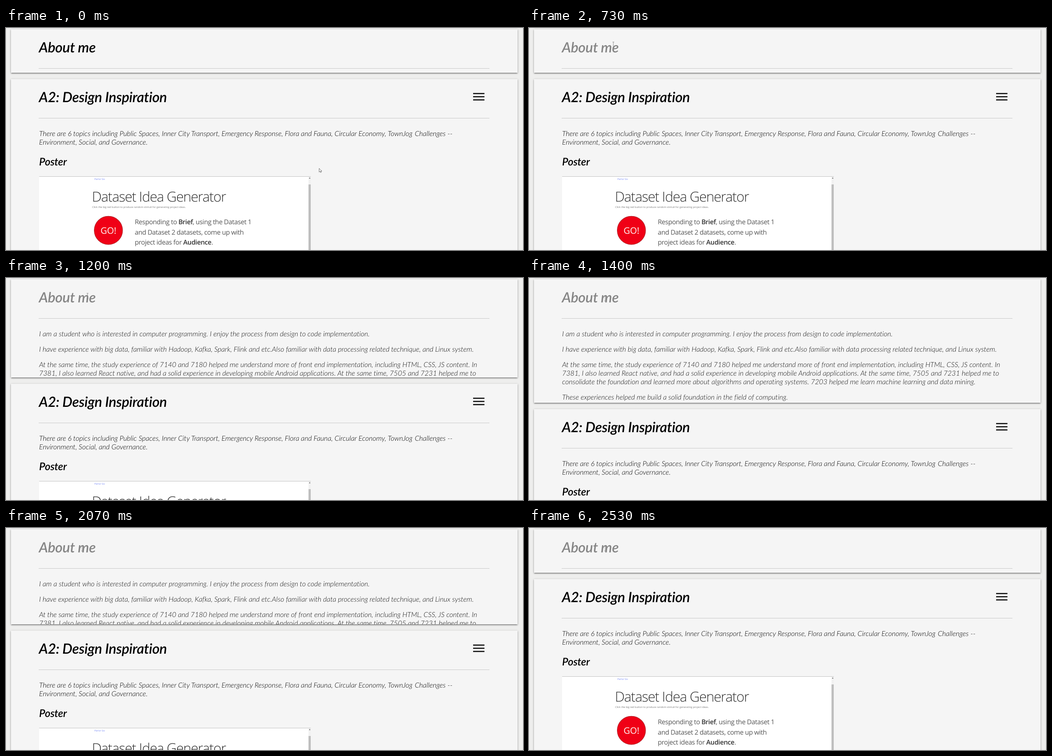
An HTML page that plays this animation: 1140x491 px, repeating every 2.87 s.

```html
<!DOCTYPE html>
<html lang="en">
<head>
<meta charset="utf-8">
<title>About me</title>
<style>
  html, body { margin: 0; width: 100%; height: 100%; overflow: hidden; background: #eeeeed; }
  #stage { position: relative; width: 1140px; height: 491px; overflow: hidden; }
  .card {
    position: absolute; left: 11px; width: 1117px; background: #f5f5f5;
    box-shadow: 0 2px 2px rgba(0,0,0,.2), 0 3px 1px -2px rgba(0,0,0,.2), 0 1px 4px rgba(0,0,0,.28);
  }
  #about { top: 2.5px; }
  #design { top: 113px; height: 700px; }
  svg { position: absolute; left: 0; top: 0; }
  text { text-rendering: geometricPrecision; white-space: pre; }
  .h1, .h2, .p { font-family: Lato, sans-serif; font-style: italic; font-variant-ligatures: none; }
  .h1 { font-size: 31.2px; font-weight: 600; letter-spacing: -.3px; }
  .h2 { font-size: 23.4px; font-weight: 600; letter-spacing: -.2px; }
  .p { font-size: 15.61px; font-weight: 300; }
  .poster { font-family: "Open Sans", sans-serif; }
  .key { font-weight: 600; fill: #333; }
  .rule { stroke: #c9c9c9; }
</style>
</head>
<body>
<div id="stage">
  <div class="card" id="about"></div>
  <div class="card" id="design"></div>
  <svg width="1140" height="491" viewBox="0 0 1140 491">
    <clipPath id="fold"><rect id="foldBox" x="11" y="90" width="1117" height="9"/></clipPath>

    <text id="title" class="h1" x="72.5" y="53.5">About me</text>
    <path class="rule" d="M72 89.5H1066"/>
    <g id="bio" class="p" fill="#111" clip-path="url(#fold)"></g>

    <g id="section">
      <text class="h1" x="72.5" y="163.8">A2: Design Inspiration</text>
      <path d="M1030 145H1055M1030 152H1055M1030 159H1055" stroke="#0a0a0a" stroke-width="2.4"/>
      <path class="rule" d="M72 199.5H1066"/>
      <g class="p">
        <text x="73" y="239">There are 6 topics including Public Spaces, Inner City Transport, Emergency Response, Flora and Fauna, Circular Economy, TownJog <tspan x="901.5">Challenges --</tspan></text>
        <text x="73" y="257.6">Environment, Social, and Governance.</text>
      </g>
      <text class="h2" x="73" y="303.6">Poster</text>

      <g class="poster">
        <rect x="73" y="328" width="599" height="400" fill="#fff"/>
        <path d="M73 328.5H672" stroke="#c4c4c4"/>
        <rect x="667" y="329" width="5" height="400" fill="#f1f1f1"/>
        <rect x="667" y="346" width="5" height="400" fill="#bfbfbf"/>
        <path d="M668 333l1.7-2.4 1.7 2.4z" fill="#666"/>
        <text x="195" y="335.6" font-size="5.2" fill="#6f82f5">Parlor Six</text>
        <text x="189.5" y="383.5" font-size="30.5" font-weight="300" letter-spacing="-1.16" fill="#333">Dataset Idea Generator</text>
        <text x="190" y="398.2" font-size="5.6" fill="#777">Click the big red button to produce random stimuli for generating project ideas.</text>
        <circle cx="225.8" cy="447.6" r="31.2" fill="#f00016" stroke="#b5202a" stroke-width="1.2"/>
        <text x="225.8" y="455" font-size="19.6" text-anchor="middle" fill="#fff">GO!</text>
        <g font-size="14.6" letter-spacing="-.42" fill="#555">
          <text x="284" y="434">Responding to <tspan class="key">Brief</tspan>, using the Dataset 1</text>
          <text x="284" y="456.5">and Dataset 2 datasets, come up with</text>
          <text x="284" y="479">project ideas for <tspan class="key">Audience</tspan>.</text>
        </g>
      </g>
    </g>

    <path id="arrow" d="M0 0V8.2L2 6.4 3.4 9.2 4.6 8.6 3.3 6H6z" fill="#fff" stroke="#555" stroke-width=".8"/>
    <path id="beam" d="M-2 -6H2M0 -6V6M-2 6H2" fill="none" stroke="#888" stroke-width=".9"/>
  </svg>
</div>
<script>
const $ = id => document.getElementById(id);
const LOOP = 2870, STEP = 200 / 3, LAST = 38;
const OPEN = 710, CLOSE = 1704, SLIDE = 831, TRAVEL = 190;

const bio = [
  [129, "I am a student who is interested in computer programming. I enjoy the process from design to code implementation."],
  [163, "I have experience with big data, familiar with Hadoop, Kafka, Spark, Flink and etc.Also familiar with data processing related technique, and Linux system."],
  [197.4, "At the same time, the study experience of 7140 and 7180 helped me understand more of front end implementation, including HTML, CSS, JS content. In"],
  [216.2, "7381, I also learned React native, and had a solid experience in developing mobile Android applications. At the same time, 7505 and 7231 helped me to"],
  [234.8, "consolidate the foundation and learned more about algorithms and operating systems. 7203 helped me learn machine learning and data mining."],
  [269, "These experiences helped me build a solid foundation in the field of computing."]
];
$("bio").innerHTML = bio.map(([y, s]) => `<text x="73" y="${y}">${s}</text>`).join("");

const clamp = x => Math.min(1, Math.max(0, x));
const swing = x => .5 - Math.cos(Math.PI * clamp(x)) / 2;
const mix = (a, b, p) => a + (b - a) * p;

function recorded(t) {
  let i = Math.min(LAST, Math.floor(t / STEP) + 1);
  while (Math.round(i * STEP / 10) * 10 > t) i--;
  return i * STEP;
}

function draw(now) {
  const t = recorded(now % LOOP);
  const drop = Math.round(TRAVEL * (swing((t - OPEN) / SLIDE) - swing((t - CLOSE) / SLIDE)));
  $("about").style.height = 96.5 + drop + "px";
  $("design").style.top = 113 + drop + "px";
  $("foldBox").setAttribute("height", 9 + drop);
  $("section").setAttribute("transform", `translate(0 ${drop})`);

  const go = swing((t - 30) / 500), nudge = swing((t - 1100) / 250);
  const x = mix(mix(690.5, 186, go), 168, nudge);
  const y = mix(mix(310.5, 37, go), 45, nudge);
  const hover = y < 66;
  $("title").setAttribute("fill", hover ? "#858585" : "#000");
  const overText = hover && x < 197;
  $("arrow").style.display = overText ? "none" : "";
  $("beam").style.display = overText ? "" : "none";
  $(overText ? "beam" : "arrow").setAttribute("transform", `translate(${x} ${y})`);
}

function tick(now) {
  draw(now);
  requestAnimationFrame(tick);
}
draw(0);
requestAnimationFrame(tick);
</script>
</body>
</html>
```
